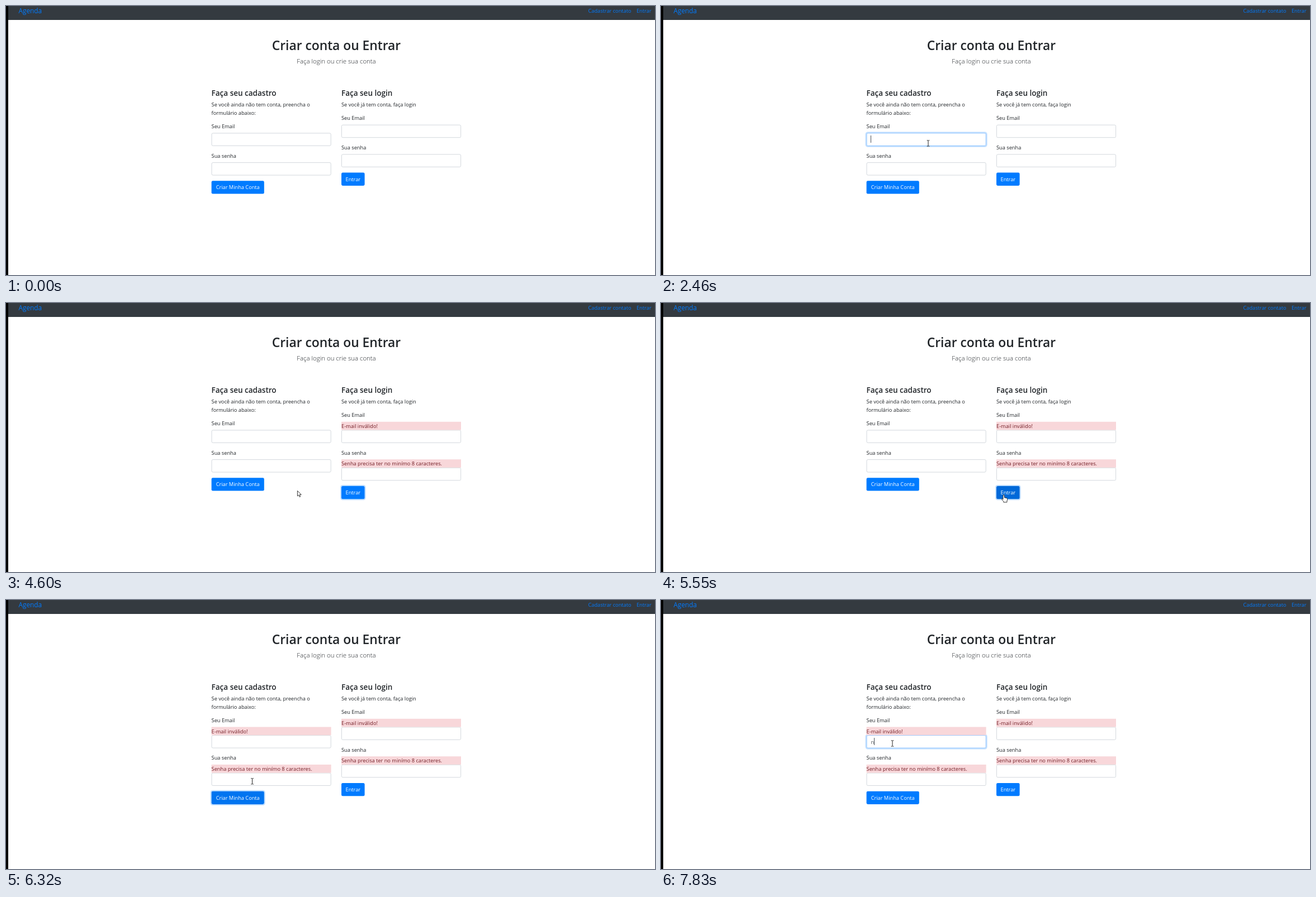
Animation, 1161 px wide and 482 px high, one loop 8 s. Source, as an HTML page:

```html
<!DOCTYPE html>
<html lang="pt-BR">
<head>
<meta charset="utf-8">
<title>Agenda</title>
<style>
  html, body { margin: 0; width: 100%; height: 100%; overflow: hidden; background: #fff; }
  svg { display: block; width: 1161px; height: 482px; }
  text { font-family: "Open Sans", "Noto Sans", sans-serif; font-size: 9.22px; fill: #212529; }
  .nav { fill: #007bff; }
  .brand { font-size: 11.8px; }
  .title { font-size: 22.8px; font-weight: 600; }
  .lead { font-size: 11.4px; font-weight: 300; }
  .head { font-size: 13.5px; font-weight: 600; }
  .err { fill: #721c24; }
  .btn { fill: #fff; }
  .typed { fill: #495057; }
</style>
</head>
<body>
<svg id="stage" viewBox="0 0 1161 482"></svg>
<script>
const LOOP = 8000, ROW = 14.7, FIELD_W = 214, FIELD_H = 23.3;
const stage = document.getElementById('stage');

function el(name, attrs, parent = stage) {
  const node = document.createElementNS('http://www.w3.org/2000/svg', name);
  for (const key in attrs) node.setAttribute(key, attrs[key]);
  parent.appendChild(node);
  return node;
}
function label(str, x, y, cls = '', parent = stage, anchor = 'start') {
  const node = el('text', { x, y, class: cls, 'text-anchor': anchor }, parent);
  node.textContent = str;
  return node;
}
const moveY = (node, y) => node.setAttribute('transform', `translate(0 ${y})`);
const show = (node, on) => node.setAttribute('visibility', on ? 'visible' : 'hidden');
const clamp = v => Math.max(0, Math.min(1, v));
const ramp = (t, start, len = 150) => clamp((t - start) / len);
const mix = (a, b, u) => `rgb(${a.map((v, i) => Math.round(v + (b[i] - v) * u))})`;

// Static page
el('rect', { width: 1161, height: 482, fill: '#fff' });
el('rect', { width: 1161, height: 25, fill: '#343a40' });
el('rect', { width: 4, height: 482, fill: '#000' });
label('Agenda', 22.5, 13, 'nav brand');
label('Cadastrar contato', 1041.5, 11.8, 'nav');
label('Entrar', 1154.5, 11.8, 'nav', stage, 'end');
label('Criar conta ou Entrar', 591, 79, 'title', stage, 'middle');
label('Faça login ou crie sua conta', 591, 103, 'lead', stage, 'middle');
label('Faça seu cadastro', 367.6, 161, 'head');
label('Se você ainda não tem conta, preencha o', 367.6, 180);
label('formulário abaixo:', 367.6, 194.6);
label('Faça seu login', 600, 161, 'head');
label('Se você já tem conta, faça login', 600, 180);

function ring(x, w, parent) {
  return el('rect', { x: x - 1, y: -1, width: w + 2, height: FIELD_H + 2, rx: 3.2,
    fill: 'none', stroke: '#007bff', 'stroke-opacity': 0.25, 'stroke-width': 2 }, parent);
}

function makeField(x) {
  const g = el('g', {});
  const halo = ring(x, FIELD_W, g);
  const box = el('rect', { x: x + 0.4, y: 0.4, width: FIELD_W - 0.8, height: FIELD_H - 0.8,
    rx: 2.2, fill: '#fff', 'stroke-width': 0.9 }, g);
  return { g, halo, box };
}

function makeAlert(x, str) {
  const g = el('g', {});
  el('rect', { x, width: FIELD_W, height: ROW, fill: '#f8d7da' }, g);
  label(str, x, 11, 'err', g);
  return g;
}

function makeForm(x, y, action, width, errorAt) {
  label('Seu Email', x, y - 8.5);
  const form = { x, y, width, errorAt };
  form.passLabel = label('Sua senha', x, 0);
  form.email = makeField(x);
  form.pass = makeField(x);
  form.emailAlert = makeAlert(x, 'E-mail inválido!');
  form.passAlert = makeAlert(x, 'Senha precisa ter no minímo 8 caracteres.');
  form.btn = el('g', {});
  form.btnRing = ring(x, width, form.btn);
  form.btnBox = el('rect', { x, width, height: FIELD_H, rx: 2.4 }, form.btn);
  label(action, x + width / 2, 15, 'btn', form.btn, 'middle');
  return form;
}

const signup = makeForm(367.6, 227.5, 'Criar Minha Conta', 94.2, 6250);
const login = makeForm(600, 212.8, 'Entrar', 41.6, 3850);
const forms = [signup, login];

function layout(form, t) {
  const shift = t >= form.errorAt ? ROW : 0;
  const pass = form.y + 52.7 + shift;
  return { shift, email: form.y + shift, passLabel: pass - 8.5, passAlert: pass,
    pass: pass + shift, btn: pass + shift + 33.1 };
}

const typed = label('n', 375.6, 257.8, 'typed');
const caret = el('rect', { width: 1, height: 13, fill: '#495057' });
const click = el('circle', { r: 7.6, fill: '#ffeb00', 'fill-opacity': 0.5 });

// Pointer shapes
const pointer = el('g', { 'stroke-linejoin': 'round' });
const shapes = {
  arrow: el('path', { d: 'M.4 .5V10L2.6 8L4.2 11.6L5.7 10.9L4.2 7.4H7.2Z',
    fill: '#fff', stroke: '#222', 'stroke-width': 0.9 }, pointer),
  beam: el('path', { d: 'M-2.3 -5.2H-.6L0 -4.6L.6 -5.2H2.3M0 -4.6V4.6M-2.3 5.2H-.6L0 4.6L.6 5.2H2.3',
    fill: 'none', stroke: '#222', 'stroke-width': 1 }, pointer),
  hand: el('path', { d: 'M-1.2 1.3A1.2 1.2 0 0 1 1.2 1.3V5L5 5.8Q6.8 6.2 6.6 8L5.8 11.4V13.4H-.3V12L-3.5 8.2Q-3.8 6.8 -2.6 7L-1.2 8.4Z',
    fill: '#fff', stroke: '#222', 'stroke-width': 0.9 }, pointer)
};

// Pointer moves: start, step length, steps, points
const smooth = u => u * u * (3 - 2 * u);
const moves = [
  { at: 70, dt: 66.6, n: 7, ease: u => 1 - (1 - u) ** 1.5, pts: [[970, 460], [680, 352], [478, 246]] },
  { at: 2860, dt: 70, n: 12, ease: smooth, pts: [[478, 246], [515, 234], [590, 285], [659, 326], [631, 310]] },
  { at: 4060, dt: 70, n: 4, ease: smooth, pts: [[631, 310], [522, 336]] },
  { at: 4600, dt: 70, n: 1, ease: smooth, pts: [[522, 336], [521, 336]] },
  { at: 5200, dt: 70, n: 12, ease: smooth, pts: [[521, 336], [622, 342], [575, 343], [442.5, 331]] },
  { at: 6320, dt: 70, n: 3, ease: smooth, pts: [[442.5, 331], [433, 302]] },
  { at: 6670, dt: 70, n: 6, ease: smooth, pts: [[433, 302], [414, 257]] }
];

function spline(pts, u) {
  const last = pts.length - 1;
  const i = Math.min(last - 1, Math.floor(u * last)), f = u * last - i;
  const at = k => pts[Math.max(0, Math.min(last, k))];
  const [a, b, c, d] = [at(i - 1), at(i), at(i + 1), at(i + 2)];
  return [0, 1].map(k => b[k] + 0.5 * f * (c[k] - a[k] +
    f * (2 * a[k] - 5 * b[k] + 4 * c[k] - d[k] + f * (3 * (b[k] - c[k]) + d[k] - a[k]))));
}

function pointerAt(t) {
  const move = moves.filter(m => t >= m.at).pop();
  if (!move) return null;
  const step = Math.min(move.n, Math.floor((t - move.at) / move.dt) + 1);
  return spline(move.pts, move.ease(step / move.n));
}

const inside = ([px, py], x, y, w, h) => px >= x && px <= x + w && py >= y && py <= y + h;

function overButton(form, t) {
  const p = pointerAt(t);
  return !!p && inside(p, form.x, layout(form, t).btn, form.width, FIELD_H);
}

// Share of the last 150 ms spent over the button
function hover(form, t) {
  let sum = 0;
  for (let i = 0; i < 5; i++) sum += overButton(form, t - i * 30);
  return sum / 5;
}

function shapeAt(p, t) {
  if (forms.some(f => overButton(f, t))) return 'hand';
  const onText = forms.some(f => {
    const l = layout(f, t);
    return inside(p, f.x, f.y, FIELD_W, FIELD_H + l.shift) ||
      inside(p, f.x, l.passAlert, FIELD_W, FIELD_H + l.shift);
  });
  return onText ? 'beam' : 'arrow';
}

function drawField(field, y, focus) {
  moveY(field.g, y);
  field.halo.setAttribute('opacity', focus);
  field.box.setAttribute('stroke', mix([206, 212, 218], [128, 189, 255], focus));
}

function drawForm(form, t, emailFocus, btnFocus) {
  const l = layout(form, t);
  drawField(form.email, l.email, emailFocus);
  drawField(form.pass, l.pass, 0);
  moveY(form.passLabel, l.passLabel);
  moveY(form.emailAlert, form.y);
  moveY(form.passAlert, l.passAlert);
  show(form.emailAlert, l.shift);
  show(form.passAlert, l.shift);
  moveY(form.btn, l.btn);
  form.btnRing.setAttribute('opacity', btnFocus * 1.6);
  form.btnBox.setAttribute('fill', mix([0, 123, 255], [0, 105, 217], hover(form, t)));
}

// Clicks: start, end, centre
const clicks = [[1390, 1500, 477.5, 244.5], [3710, 3850, 630.5, 310],
  [6110, 6250, 442.5, 331], [7090, 7200, 414, 256]];

function caretOn(t) {
  if (t >= 7830) return true;
  const start = t >= 7100 ? 7100 : 1395;
  if (t < start || (t >= 3650 && t < 7100)) return false;
  return Math.floor((t - start) / 532) % 2 === 0;
}

function draw(t) {
  const first = ramp(t, 1360) - ramp(t, 3640);
  drawForm(signup, t, first + ramp(t, 7060), ramp(t, 6150) - ramp(t, 7060));
  drawForm(login, t, 0, ramp(t, 3800) - ramp(t, 6080));

  show(typed, t >= 7830);
  show(caret, caretOn(t));
  caret.setAttribute('x', t >= 7830 ? 381 : 375);
  caret.setAttribute('y', t >= 7000 ? 247 : 232);

  const hit = clicks.find(c => t >= c[0] && t < c[1]);
  show(click, hit);
  if (hit) {
    click.setAttribute('cx', hit[2]);
    click.setAttribute('cy', hit[3]);
  }

  const p = pointerAt(t);
  const kind = p && shapeAt(p, t);
  for (const name in shapes) show(shapes[name], name === kind);
  if (p) pointer.setAttribute('transform', `translate(${p[0]} ${p[1]})`);
}

const begin = performance.now();
function tick() {
  draw((performance.now() - begin) % LOOP);
  requestAnimationFrame(tick);
}
tick();
</script>
</body>
</html>
```
